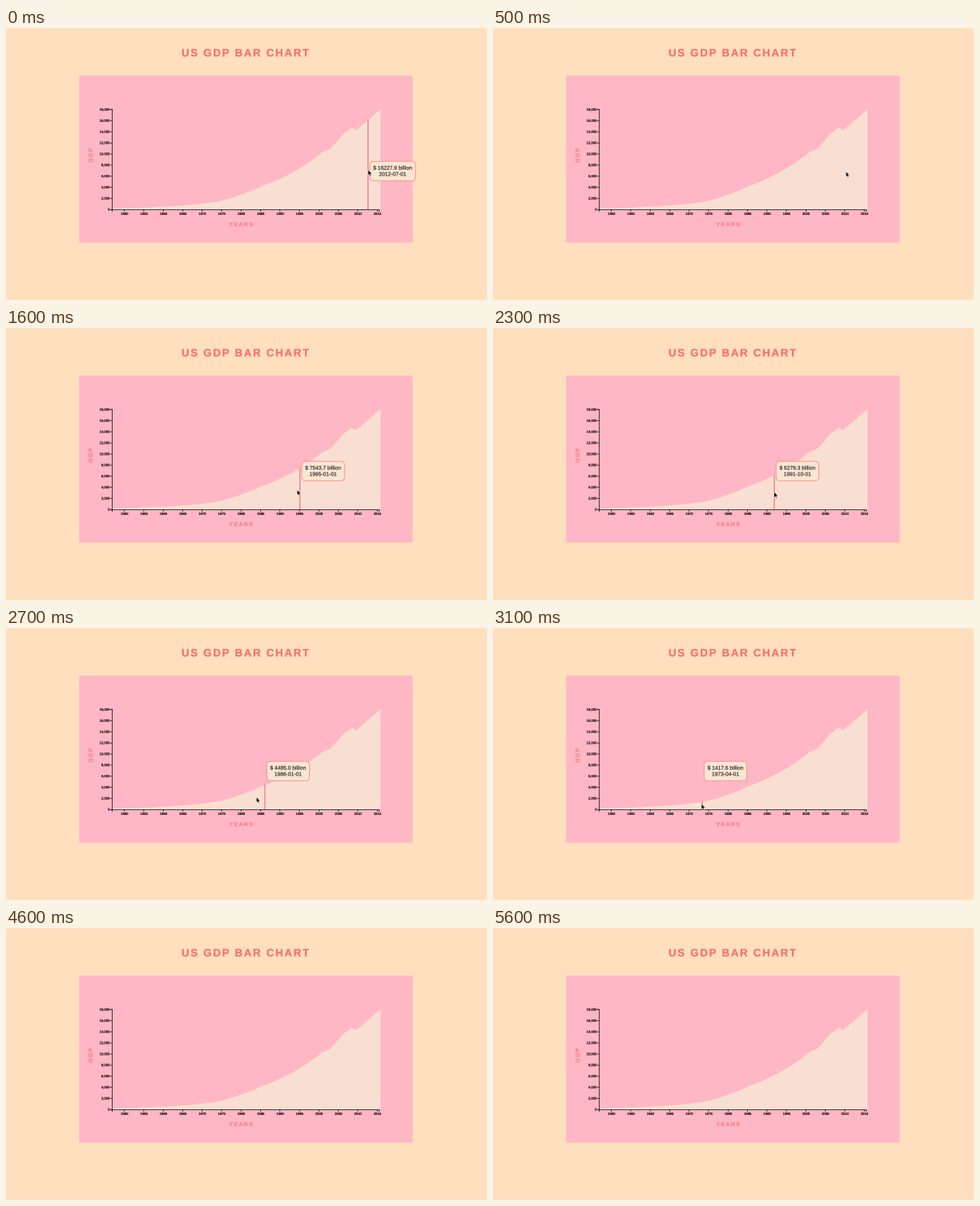
A matplotlib script that plays this animation: 600 px wide and 339 px high, repeating every 5700 ms.

```python
import numpy as np
import matplotlib.pyplot as plt
from matplotlib.animation import FuncAnimation
from matplotlib.patches import FancyBboxPatch, PathPatch, Polygon, Rectangle
from matplotlib.path import Path
from matplotlib.textpath import TextPath
from matplotlib.transforms import Affine2D

W, H, DPI = 600, 339, 64
PX = 72 / DPI  # points per pixel
FRAMES, STEP = 57, 100

PEACH, PINK, CREAM = "#ffdfbd", "#ffb6c5", "#f9dfd2"
CORAL, INK = "#f86d6d", "#333030"
TIP_FILL, TIP_EDGE, HOVER = "#f9e6d2", "#fb8f89", "#f4747c"

LEFT, RIGHT, BASE, TOP = 132.6, 465.7, 226, 101.3
YEAR_PX = 4.854
UNIT_PX = 124.5 / 18000
TIP_SIZE = 20 / 3

# Year and billions; steady growth rate between these turning points
GROWTH = [(1947, 243.1), (1960, 540), (1973.25, 1417.6), (1980, 2790),
          (1985, 4230), (1991.75, 6279.3), (2000.5, 10290), (2002.75, 11000),
          (2004, 11988.4), (2006, 13650), (2008.25, 14800), (2009.25, 14340),
          (2012.5, 16227.9), (2015.5, 18064.7)]
YEARS, VALUES = np.array(GROWTH).T

# Pointer path: frame, x, y
POINTER = [(0, 451.9, 177), (5, 440.2, 178.8), (7, 438.2, 179.5),
           (11, 405, 192), (13, 379, 198), (18, 352.5, 204),
           (23, 350.8, 204.5), (25, 346, 205.5), (30, 262, 218.8),
           (31, 260, 219.2), (37, 238, 221.5)]
POINTER_T, POINTER_X, POINTER_Y = np.array(POINTER).T

# Spans of frames in which the pointer rests on a bar
HOVERS = [(0, 1), (7, 11), (14, 17), (19, 23), (25, 28), (31, 34), (38, 40)]
LAG = 0.65  # frames by which the tooltip trails the pointer
EXIT = 45   # pointer leaves below the panel


def year_x(year):
    return 147.6 + (year - 1950) * YEAR_PX


def value_y(value):
    return BASE - value * UNIT_PX


def gdp(year):
    return np.exp(np.interp(year, YEARS, np.log(VALUES)))


def glyphs(s, size, weight):
    return TextPath((0, 0), s, size=size,
                    prop={"family": "Liberation Sans", "weight": weight})


def advance(s, size, weight="normal"):
    """Pen advance, including trailing spaces."""
    return (glyphs(s + "|", size, weight).get_extents().x1
            - glyphs("|", size, weight).get_extents().x1)


def text_path(x, y, s, size, align=0.5, weight="normal", spacing=0, turn=0):
    """Outline of s with its baseline at y; align 0 left, 0.5 centre, 1 right."""
    if spacing:
        parts, pen = [], 0
        for c in s:
            if c != " ":
                shift = Affine2D().translate(pen, 0)
                parts.append(glyphs(c, size, weight).transformed(shift))
            pen += advance(c, size, weight) + spacing
        path, width = Path.make_compound_path(*parts), pen - spacing
    else:
        path, width = glyphs(s, size, weight), advance(s, size, weight)
    place = Affine2D().translate(-width * align, 0).scale(1, -1)
    return path.transformed(place.rotate_deg(turn).translate(x, y))


def draw_text(path, color, z=3):
    return ax.add_patch(PathPatch(path, fc=color, ec=color, lw=0.18 * PX,
                                  zorder=z))


def line(xs, ys):
    ax.plot(xs, ys, color="black", lw=0.7 * PX, zorder=3, snap=False,
            solid_capstyle="butt", solid_joinstyle="miter")


fig = plt.figure(figsize=(W / DPI, H / DPI), dpi=DPI, facecolor=PEACH)
ax = fig.add_axes([0, 0, 1, 1])
ax.set_xlim(0, W)
ax.set_ylim(H, 0)
ax.axis("off")

ax.add_patch(Rectangle((91.3, 59.4), 415.9, 208, fc=PINK, lw=0, snap=False))
draw_text(text_path(298.5, 35.4, "US GDP BAR CHART", 40 / 3, weight="bold",
                    spacing=5 / 3), CORAL)
draw_text(text_path(293.1, 246.9, "YEARS", TIP_SIZE, spacing=5 / 3), CORAL)
draw_text(text_path(107.8, 158.6, "GDP", TIP_SIZE, spacing=5 / 3, turn=-90),
          CORAL)

quarters = np.arange(1947, 2015.8, 0.25)
ax.fill_between(year_x(quarters), value_y(gdp(quarters)), BASE, step="post",
                color=CREAM, lw=0, zorder=1)

floor = BASE + 0.4
line([LEFT - 2.5, LEFT, LEFT, LEFT - 2.5], [TOP, TOP, floor, floor])
line([LEFT, LEFT, RIGHT, RIGHT], [floor + 2.5, floor, floor, floor + 2.5])
for value in range(0, 18001, 2000):
    y = value_y(value) + 0.3
    line([LEFT - 2.5, LEFT], [y, y])
    draw_text(text_path(129.4, y + 1.2, f"{value:,}", 4.17, align=1), "black")
for year in range(1950, 2016, 5):
    x = year_x(year)
    line([x, x], [floor, floor + 2.5])
    draw_text(text_path(x + 0.2, 232.9, str(year), 4.17), "black")

empty = Path(np.zeros((1, 2)))
bar = ax.add_patch(Rectangle((0, 0), 1.2, 1, fc=HOVER, lw=0, zorder=2,
                             snap=False))
box = ax.add_patch(FancyBboxPatch(
    (0, 0), 50, 24, boxstyle="round,pad=0,rounding_size=4.6",
    fc=TIP_FILL, ec=TIP_EDGE, lw=0.9 * PX, zorder=5))
amount = draw_text(empty, INK, 6)
date = draw_text(empty, INK, 6)
tip = (bar, box, amount, date)

ARROW = np.array([(0, 0), (0, 6.7), (1.5, 5.3), (2.5, 7.6), (3.6, 7.1),
                  (2.6, 4.9), (4.7, 4.8)])
arrow = ax.add_patch(Polygon(ARROW, fc="black", ec="white", lw=0.4 * PX,
                             joinstyle="miter", zorder=8))


def pointer(t):
    return np.array([np.interp(t, POINTER_T, POINTER_X),
                     np.interp(t, POINTER_T, POINTER_Y)])


def quarter_at(x):
    """Start of the quarter whose bar covers x."""
    return 1950 + np.floor((x - year_x(1950)) / YEAR_PX * 4) / 4


def show_tip(year):
    x, value = year_x(year), gdp(year)
    label = f"$ {value:.1f} billion"
    width = advance(label, TIP_SIZE) + 8.4
    left = x + 2.9
    mid = left + width / 2
    month = int(year % 1 * 12) + 1
    bar.set_bounds(x, value_y(value), 1.2, BASE - value_y(value))
    box.set_bounds(left, 166.2, width, 24.1)
    amount.set_path(text_path(mid, 176.5, label, TIP_SIZE))
    date.set_path(text_path(mid, 184.3, f"{int(year)}-{month:02d}-01", TIP_SIZE))


def update(frame):
    hovering = any(start <= frame <= end for start, end in HOVERS)
    for part in tip:
        part.set_visible(hovering)
    if hovering:
        show_tip(quarter_at(pointer(frame - LAG)[0]))

    drop = 71 if frame == EXIT else 0
    arrow.set_xy(ARROW + pointer(frame) + (0, drop))
    arrow.set_visible(frame <= EXIT)
    return (*tip, arrow)


anim = FuncAnimation(fig, update, frames=FRAMES, interval=STEP, repeat=True,
                     repeat_delay=0, blit=False)
plt.show()
```
